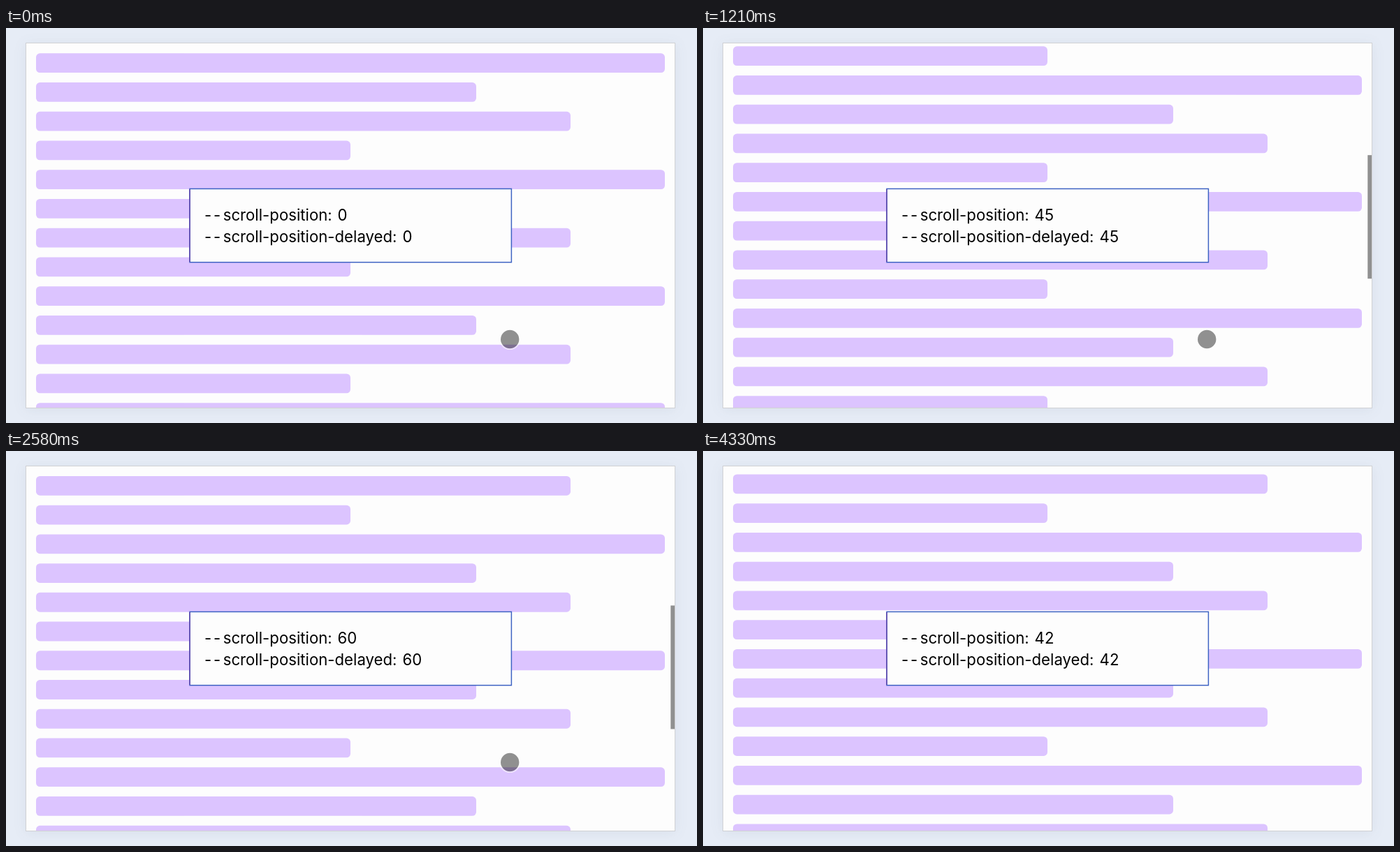
Recreate the animation shown at these times as an HTML page. Size 989 px wide and 566 px high, loop 4750 ms.

```html
<!DOCTYPE html>
<html lang="en">
<head>
<meta charset="utf-8">
<title>Scroll position</title>
<style>
  html, body { margin: 0; width: 100%; height: 100%; overflow: hidden; background: #e6ecf6; }
  svg { display: block; width: 989px; height: 566px; }
  .panel { fill: #fdfdfd; stroke: #d0d1d4; filter: drop-shadow(0 2px 9px rgba(60, 70, 90, .07)); }
  .info { font: 22.2px Inter, "Open Sans", sans-serif; fill: #000; }
  .dashes { letter-spacing: 2.9px; }
</style>
</head>
<body>
<svg viewBox="0 0 989 566">
  <defs>
    <clipPath id="view"><rect x="29" y="22" width="928" height="522"/></clipPath>
  </defs>
  <rect width="989" height="566" fill="#e6ecf6"/>
  <rect class="panel" x="28.5" y="21.5" width="929" height="523"/>
  <g clip-path="url(#view)">
    <g id="bars" fill="#dcc4ff"></g>
    <rect id="thumb" x="951.3" width="5.9" height="177" fill="#909090"/>
  </g>
  <rect x="263" y="230.4" width="460.4" height="105.3" fill="#fdfdfd" stroke="#3e63c3" stroke-width="1.5"/>
  <path d="M263 231V335" stroke="#6448ab" stroke-width="1.5"/>
  <g class="info">
    <text y="276"><tspan class="dashes" x="284">--</tspan><tspan x="310.7">scroll-position:</tspan></text>
    <text y="307.4"><tspan class="dashes" x="284">--</tspan><tspan x="310.7">scroll-position-delayed:</tspan></text>
    <text id="now" x="474.6" y="276">0</text>
    <text id="delayed" x="567.6" y="307.4">0</text>
  </g>
  <g id="pointer">
    <circle cx="721.2" cy="446" r="14.1" fill="none" stroke="#fff" stroke-opacity=".55" stroke-width="2"/>
    <circle cx="721.2" cy="446" r="13.2" fill-opacity=".43"/>
  </g>
</svg>
<script>
const LOOP = 4750;
const ROWS = 36, PITCH = 41.74, MAX_SCROLL = 995;
const WIDTHS = [900, 630, 765, 450];
const TEXT_LAG = 16;

// time in ms, scroll offset in px, speed in px/s
const PATH = [
  [40, 0, 0], [880, 165.3, 200], [1580, 858.6, 400], [2110, 995, 0],
  [2290, 975.3, -280], [2580, 585.6, -850], [2920, 435.7, -130], [3210, 420.2, 0]
];

const $ = id => document.getElementById(id);
const clamp = x => Math.min(1, Math.max(0, x));

for (let i = 0; i < ROWS; i++) {
  const bar = document.createElementNS("http://www.w3.org/2000/svg", "rect");
  const attrs = { x: 43, y: 36.3 + i * PITCH, width: WIDTHS[i % 4], height: 27.8, rx: 5.5 };
  for (const key in attrs) bar.setAttribute(key, attrs[key]);
  $("bars").append(bar);
}

// Cubic Hermite curve through the path points
function scrollAt(t) {
  if (t <= PATH[0][0]) return 0;
  const i = PATH.findIndex(p => p[0] >= t);
  if (i < 0) return PATH[PATH.length - 1][1];
  const [t0, y0, v0] = PATH[i - 1], [t1, y1, v1] = PATH[i];
  const span = t1 - t0, u = (t - t0) / span, w = 1 - u, s = span / 1000;
  return y0 * (1 + 2 * u) * w * w + v0 * s * u * w * w
       + y1 * u * u * (3 - 2 * u) - v1 * s * u * u * w;
}

function draw(t) {
  const y = scrollAt(t);
  const percent = Math.round(scrollAt(t - TEXT_LAG) / MAX_SCROLL * 100);
  const fade = 1 - clamp((t - 3510) / 320);
  $("bars").setAttribute("transform", `translate(0 ${-y})`);
  $("thumb").setAttribute("y", 22.9 + 337.8 * y / MAX_SCROLL);
  $("thumb").setAttribute("opacity", clamp((t - 40) / 60) * fade);
  $("pointer").setAttribute("opacity", fade);
  $("now").textContent = $("delayed").textContent = percent;
}

const start = performance.now();
function tick() {
  draw((performance.now() - start) % LOOP);
  requestAnimationFrame(tick);
}
tick();
</script>
</body>
</html>
```
